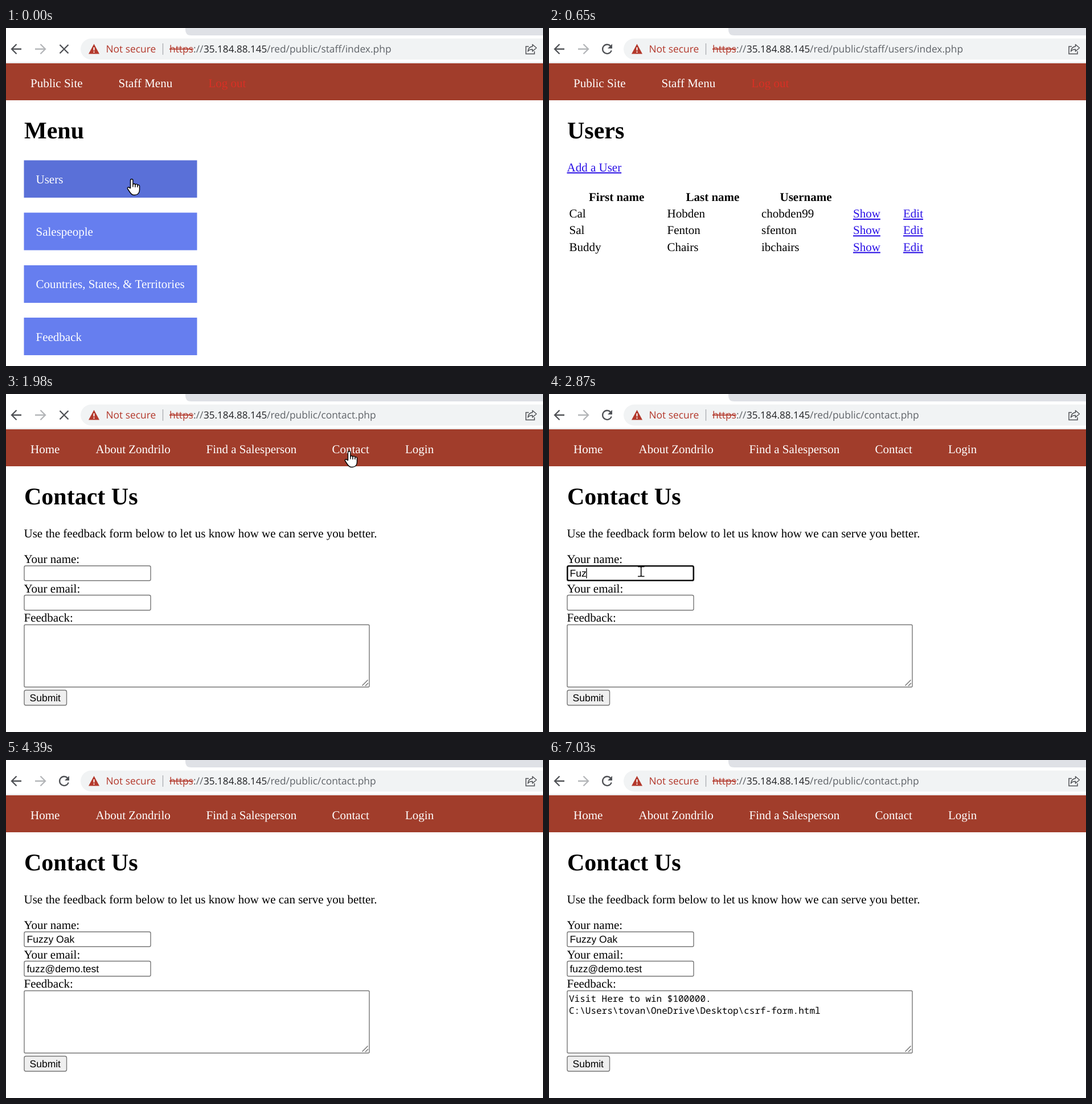
These frames come from a looping animation (943x594 px, 8 s). An HTML page:

```html
<!DOCTYPE html>
<html lang="en">
<head>
<meta charset="utf-8">
<title>Feedback form walkthrough</title>
<style>
  html, body { margin: 0; width: 100%; height: 100%; overflow: hidden; background: #fff; }
  svg { display: block; width: 943px; height: 594px; }
  text { font: 21px "Liberation Serif", "Times New Roman", serif; text-rendering: geometricPrecision; white-space: pre; }
  .heading { font-size: 42px; font-weight: bold; }
  .bold { font-weight: bold; }
  .nav text, .menu text { fill: #fff; }
  .nav .logout { fill: #d93025; }
  .menu rect { fill: #667eef; }
  .menu .hover { fill: #5a70d8; }
  .link { fill: #2a10e6; text-decoration: underline; }
  .bar text { font: 17.4px "Open Sans", "Noto Sans", sans-serif; fill: #5f6368; }
  .bar .alert { fill: #b3382b; }
  .bar .struck { fill: #b3382b; text-decoration: line-through; }
  .bar .host { fill: #202124; }
  .icon { fill: none; stroke: #505256; stroke-width: 2.3; }
  .field { fill: #fff; stroke: #767676; stroke-width: 1.4; }
  .focus { fill: #fff; stroke: #101010; stroke-width: 2.6; }
  .typed text, .button { font: 17.5px "Liberation Sans", Arial, sans-serif; }
  .typed .mono { font: 16px "Noto Sans Mono", "DejaVu Sans Mono", monospace; }
  .caret { stroke: #000; stroke-width: 1.3; }
  .cursor { fill: #fff; stroke: #000; stroke-width: 1.4; stroke-linejoin: round; }
  [data-show] { visibility: hidden; }
</style>
</head>
<body>
<svg viewBox="0 0 943 594" xmlns="http://www.w3.org/2000/svg">
  <defs>
    <g id="hand" class="cursor">
      <path d="M6.5 17V3.2a2.2 2.2 0 0 1 4.4 0V11a2 2 0 0 1 4 .5a2 2 0 0 1 4 .8a1.9 1.9 0 0 1 3.6 1V20c0 5-3 9-8 9h-2c-3 0-5-2-7-5l-4-6c-1-2 1.500-3.500 3-2z"/>
      <path d="M10.900 11v4M14.900 11.500v4M18.900 12.500v3"/>
    </g>
    <path id="arrow" class="cursor" d="M.7.7V20.500l4.600-4.400 3.200 7.700 3.400-1.400-3.200-7.200h6.400z"/>
  </defs>

  <!-- Browser chrome -->
  <g class="bar">
    <path fill="#dfe1e6" d="M315 0H943V13H325Q315 13 315 3z"/>
    <rect x="131" y="18.500" width="840" height="37" rx="18.500" fill="#f1f3f4"/>
    <path stroke="#dcdde0" d="M0 60.500H943"/>
    <path class="icon" d="M27 37H10.500M18.500 28.500L10 37L18.500 45.500"/>
    <path class="icon" style="stroke:#b4b6b9" d="M51 37H68.500M60.500 28.500L69 37L60.500 45.500"/>
    <path class="icon" data-show="0-140 1980-2100" d="M94.500 29.500L109.500 44.500M109.500 29.500L94.500 44.500"/>
    <g data-show="140-1980 2100-8000">
      <path class="icon" d="M108 31.600A8 8 0 1 0 109.700 39.500"/>
      <path fill="#505256" d="M111 28V36H103z"/>
    </g>
    <path fill="#b3382b" d="M154.500 28L164 45.500H145z"/>
    <path stroke="#fff" stroke-width="2" d="M154.500 34V39.500M154.500 41.200V43.200"/>
    <text class="alert" x="175.500" y="43">Not secure</text>
    <path stroke="#a9acb0" stroke-width="1.300" d="M275.500 27V47"/>
    <text class="struck" x="287" y="43">https</text>
    <text x="329" y="43">://</text>
    <text class="host" x="347" y="43" style="font-size:17.100px">35.184.88.145</text>
    <text x="458" y="43" data-show="0-140">/red/public/staff/index.php</text>
    <text x="458" y="43" data-show="140-1420">/red/public/staff/users/index.php</text>
    <text x="458" y="43" data-show="1420-1980">/red/public/index.php</text>
    <text x="458" y="43" data-show="1980-8000">/red/public/contact.php</text>
    <g class="icon" style="stroke-width:1.500">
      <path d="M918 32.500H913V45.500H928V41"/>
      <path stroke-linejoin="round" d="M924.500 29L931.500 35L924.500 41V37.500Q919.500 37.200 916.500 41Q917.500 33 924.500 32.500z"/>
    </g>
  </g>

  <!-- Site navigation -->
  <rect y="62" width="943" height="65" fill="#a13d2b"/>
  <g class="nav" data-show="0-1420">
    <text x="43" y="103.500">Public Site</text>
    <text x="197.500" y="103.500">Staff Menu</text>
    <text class="logout" x="355.500" y="103.500">Log out</text>
  </g>
  <g class="nav" data-show="1420-8000">
    <text x="43" y="103.500">Home</text>
    <text x="157.500" y="103.500">About Zondrilo</text>
    <text x="351.500" y="103.500">Find a Salesperson</text>
    <text x="572.500" y="103.500">Contact</text>
    <text x="701" y="103.500">Login</text>
  </g>

  <!-- Staff menu -->
  <g class="menu" data-show="0-140">
    <rect class="hover" x="31.500" y="232.500" width="304" height="65.700"/>
    <rect x="31.500" y="324.500" width="304" height="66"/>
    <rect x="31.500" y="417" width="304" height="66"/>
    <rect x="31.500" y="509" width="304" height="66"/>
    <text x="52.500" y="272.500">Users</text>
    <text x="52.500" y="365">Salespeople</text>
    <text x="52.500" y="457">Countries, States, &amp; Territories</text>
    <text x="52.500" y="549.500">Feedback</text>
  </g>
  <text class="heading" x="32" y="194" data-show="0-140">Menu</text>

  <!-- Users -->
  <g data-show="140-1420">
    <text class="heading" x="32" y="194">Users</text>
    <text class="link" x="31.500" y="251.500">Add a User</text>
    <text class="bold" x="70" y="304">First name</text>
    <text class="bold" x="240.500" y="304">Last name</text>
    <text class="bold" x="405.500" y="304">Username</text>
    <g id="rows"></g>
  </g>

  <!-- Welcome -->
  <g data-show="1420-1980">
    <text class="heading" x="32" y="194">Welcome to Zondrilo!</text>
    <text x="31.500" y="251.500">Zondrilo is a world-wide industry leader with many award-winning products</text>
    <text x="31.500" y="275.500">which have become well-known household names. Our staff of experts are</text>
    <text x="31.500" y="299.500">dedicated to finding synergies across a wide variety of vertical markets and</text>
    <text x="31.500" y="323.500">integrating technology into everyday life.</text>
  </g>

  <!-- Contact form -->
  <g data-show="1980-8000">
    <text class="heading" x="32" y="194">Contact Us</text>
    <text x="31.500" y="251.500">Use the feedback form below to let us know how we can serve you better.</text>
    <text x="31.500" y="296.500">Your name:</text>
    <text x="31.500" y="348.500">Your email:</text>
    <text x="31.500" y="400">Feedback:</text>
    <rect class="field" x="32" y="302" width="222" height="26" rx="2.600"/>
    <rect class="field" x="32" y="353.500" width="222" height="26.500" rx="2.600"/>
    <rect class="field" x="32" y="405.500" width="606" height="109.500" rx="2"/>
    <path stroke="#6a6a6a" stroke-width="1.300" d="M625.500 512.500L635.500 502.500M631 513L636 508"/>
    <rect class="field" style="fill:#efefef" x="32" y="520.500" width="74.500" height="26.500" rx="3"/>
    <text class="button" x="41.500" y="540">Submit</text>
  </g>
  <rect class="focus" x="32.300" y="302.300" width="221.500" height="25.500" rx="2.600" data-show="2100-3380"/>
  <g class="typed">
    <text x="36.500" y="321" data-show="2620-2870">F</text>
    <text x="36.500" y="321" data-show="2870-3380">Fuz</text>
    <text x="36.500" y="321" data-show="3380-8000">Fuzzy Oak</text>
    <text x="36.500" y="373" data-show="4390-8000">fuzz@demo.test</text>
    <text class="mono" x="35" y="425" data-show="5890-8000">Visit Here to win $100000.</text>
    <text class="mono" x="35" y="445.500" data-show="7030-8000">C:\Users\tovan\OneDrive\Desktop\csrf-form.html</text>
  </g>
  <path class="caret" d="M37.500 306V324" data-show="2100-2620"/>
  <path class="caret" d="M47.200 306V324" data-show="2620-2870"/>
  <path class="caret" d="M65.900 306V324" data-show="2870-3380"/>

  <!-- Pointer -->
  <use href="#hand" x="212" y="264.500" data-show="0-140"/>
  <use href="#arrow" x="738" y="467" data-show="140-400"/>
  <use href="#arrow" x="560" y="385" data-show="400-525"/>
  <use href="#arrow" x="300" y="325" data-show="525-650"/>
  <use href="#hand" x="594" y="99.500" data-show="1690-2100"/>
  <path fill="none" stroke="#000" stroke-width="1.600" data-show="2100-3380"
        d="M156 303.500H160Q161.700 303.500 161.700 305Q161.700 303.500 163.400 303.500H167.500M161.700 304.500V319.500M156 320.500H160Q161.700 320.500 161.700 319Q161.700 320.500 163.400 320.500H167.500"/>
</svg>
<script>
  const LOOP = 8000;
  const users = [
    ["Cal", "Hobden", "chobden99"],
    ["Sal", "Fenton", "sfenton"],
    ["Buddy", "Chairs", "ibchairs"]
  ];
  const columns = [35.5, 207.5, 373, 534, 622];

  document.getElementById("rows").innerHTML = users.map((user, row) =>
    [...user, "Show", "Edit"].map((label, col) =>
      `<text x="${columns[col]}" y="${333 + row * 29.3}" class="${col > 2 ? "link" : ""}">${label}</text>`
    ).join("")).join("");

  const timed = [...document.querySelectorAll("[data-show]")].map(el => ({
    el,
    spans: el.dataset.show.split(" ").map(span => span.split("-").map(Number))
  }));

  const start = performance.now();
  function draw(now) {
    const t = Math.max(0, now - start) % LOOP;
    for (const { el, spans } of timed) {
      const on = spans.some(([from, to]) => t >= from && t < to);
      el.style.visibility = on ? "visible" : "hidden";
    }
    requestAnimationFrame(draw);
  }
  draw(start);
</script>
</body>
</html>
```
